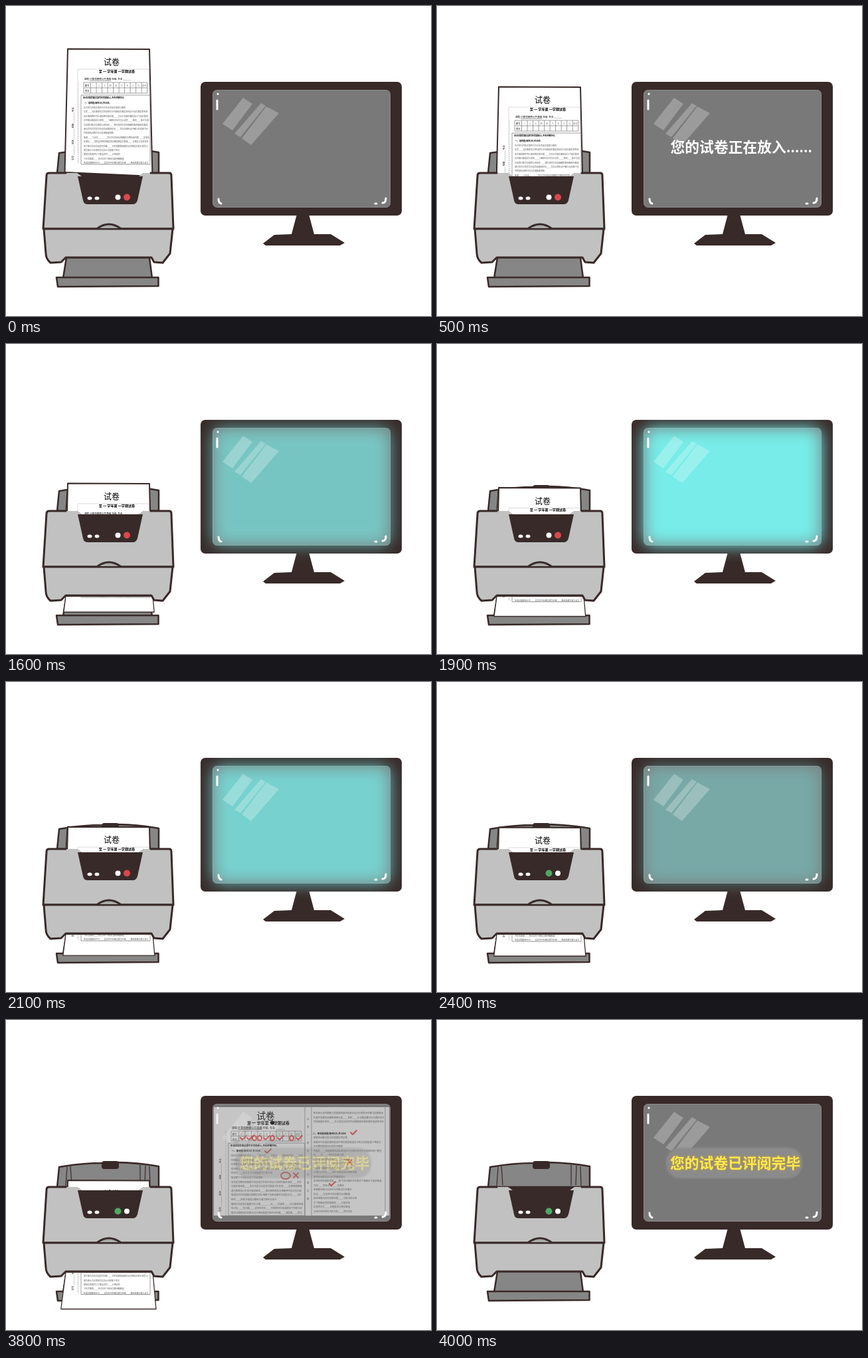
An HTML page for the animation above (5500 ms loop, 640 by 466 pixels).

```html
<!DOCTYPE html>
<html lang="zh-CN">
<head>
<meta charset="utf-8">
<title>试卷扫描</title>
<style>
html, body { margin: 0; width: 100%; height: 100%; overflow: hidden; background: #fff; }
svg { display: block; width: 640px; height: 466px; font-family: "Noto Sans CJK SC", "Noto Sans CJK", "Noto Sans", sans-serif; }
.ink { stroke: #382a29; stroke-width: 3; stroke-linejoin: round; stroke-linecap: round; }
.dark { fill: #382a29; }
.thin { fill: none; stroke: #777; stroke-width: .7; }
.red { fill: none; stroke: #d94a4a; stroke-width: 2; stroke-linecap: round; stroke-linejoin: round; }
.mark { fill: none; stroke: #fff; stroke-width: 3; stroke-linecap: round; }
.message { font-size: 21.8px; font-weight: 700; }
</style>
</head>
<body>
<svg id="stage" viewBox="0 0 640 466"></svg>
<script>
const LOOP = 5500, STEP = 100;

let seed = 7;
const random = () => (seed = seed * 16807 % 2147483647) / 2147483647;

const text = (x, y, size, value, extra = '') =>
  `<text x="${x}" y="${y}" font-size="${size}" ${extra}>${value}</text>`;

// Small exam prose with answer blanks, about `width` pixels long.
function prose(width, size) {
  const chars = '在计算机网络中数据通信系统的基本组成包括信道传输方式与协议下列说法正确是地址分层模型服务功能应用';
  let line = '', used = 0;
  while (used < width - size) {
    if (random() < .06 && used < width - size * 3) {
      line += '____';
      used += size * 2;
    } else {
      line += chars[Math.floor(random() * chars.length)];
      used += size;
    }
  }
  return line;
}

function paragraph(x, y, width, count, gap, size, shortShare = .3) {
  let out = '';
  for (let i = 0; i < count; i++) {
    const part = random() < shortShare ? .4 + random() * .3 : 1;
    out += text(x, y + i * gap, size, prose(width * part, size), 'fill="#555"');
  }
  return out;
}

function scoreTable(x, y, width, height) {
  let d = `M${x} ${y}h${width}v${height}h${-width}zM${x} ${y + height / 2}h${width}`;
  for (let i = 0; i < 10; i++) d += `M${x + width * (.11 + i * .089)} ${y}v${height}`;
  let out = `<path class="thin" d="${d}"/>`;
  out += text(x + 2, y + height * .4, 3.2, '题号') + text(x + 2, y + height * .9, 3.2, '得分');
  [...'一二三四五六七八九'].forEach((n, i) => {
    out += text(x + width * (.135 + i * .089), y + height * .4, 3.2, n, 'fill="#555"');
  });
  return out + text(x + width * .92, y + height * .4, 3.2, '总分', 'fill="#555"');
}

function exam({ x, width, top, bottom, title, sub, form, table, gap, size }) {
  const inner = width - 7, height = top - 3 - table;
  return text(title.x, title.y, title.size, '试卷', `text-anchor="middle" font-weight="${title.weight}"`) +
    text(sub.x, sub.y, sub.size, '至 一 学年第 一学期试卷', 'text-anchor="middle" font-weight="700"') +
    text(x + 5, form, size * 1.2, '课程 <tspan text-decoration="underline">计算机网络公共基础</tspan> 年级: 专业 ______') +
    scoreTable(x + 4, table, width * .92, height) +
    `<path class="thin" d="M${x} ${bottom}V${top}H${x + width}V${bottom}z"/>` +
    text(x + 3, top + 5, size, '本试试题答案全部写在答题纸上,不论对错均可。', 'font-weight="700"') +
    text(x + 5, top + 13, size, '一、填空题(每空1分,共30分)', 'font-weight="700"') +
    paragraph(x + 4, top + 20, inner, Math.floor((bottom - top - 20) / gap) + 1, gap, size) +
    text(-(bottom - 6), x - 11, 3.5, '学号 ________ 姓名 ________ 班级 ________ 专业', 'transform="rotate(-90)"') +
    `<path class="thin" stroke-dasharray="1 2" d="M${x - 4} ${table}V${bottom}"/>`;
}

const check = (x, y) => `<path class="red" d="M${x - 4} ${y}l3 3l6 -6"/>`;
const cross = (x, y) => `<path class="red" d="M${x - 4} ${y - 3}l7 7m0 -7l-7 7"/>`;
const ring = (x, y, rx, ry) => `<ellipse class="red" cx="${x}" cy="${y}" rx="${rx}" ry="${ry}"/>`;

const printed = exam({
  x: 113, width: 104, top: 134, bottom: 238, gap: 6.4, size: 3,
  title: { x: 159, y: 89, size: 12, weight: 500 }, sub: { x: 167, y: 99.5, size: 5.1 }, form: 111, table: 115
}) + '<path fill="none" stroke="#ccc" stroke-width=".7" d="M108 235V95H215V134"/>';

const scanned = `<rect x="313" y="131" width="264" height="163" fill="#ebebec"/>` +
  exam({
    x: 335, width: 115, top: 185, bottom: 294, gap: 6.6, size: 3.4,
    title: { x: 391, y: 149, size: 13.5, weight: 400 }, sub: { x: 395, y: 156.5, size: 6 }, form: 163.5, table: 167
  }) +
  '<path class="thin" d="M450 131V294M460 131V294M571 131V294"/>' +
  [...'试卷一密封线内不要答题'].map((c, i) => text(453, 150 + i * 12, 3.4, c, 'fill="#555"')).join('') +
  paragraph(463, 141, 106, 3, 6.5, 3.4) +
  text(462, 172, 3.4, '二、单项选择题(每空1分,共30分)', 'font-weight="700"') +
  paragraph(463, 178, 104, 18, 6.5, 3.4, .6) +
  '<circle cx="401" cy="154.500" r="3"/>' +
  [357, 367, 392, 413, 441].map(x => check(x, 177)).join('') +
  [374, 382, 401, 430].map(x => ring(x, 177.5, 3, 3.5)).join('') +
  check(394, 197) + check(523, 169) + check(491, 246) +
  ring(421, 234, 7, 5) + cross(437, 233) + cross(518, 213);

const monitor = `
  <path class="dark" d="M438 313h18l8 30h25l21 13l-7 4H391l-4-3l17-13l26-1z"/>
  <rect class="dark" x="293" y="114" width="303" height="201" rx="7"/>
  <rect x="311.500" y="126.500" width="267" height="176" rx="6" fill="#797979" stroke="#8c8c8c"/>
  <g id="glow" clip-path="url(#monitorShape)">
    <rect x="311" y="126" width="268" height="177" rx="14" fill="#77ece8" filter="url(#soft)"/>
  </g>
  <path fill="#fff" opacity=".25" d="M357 138l14 9l-30 40l-15-10zM384 146l7 4l-38 47l-9-5zM392 151l19 10l-42 48l-14-10z"/>
  <path class="mark" d="M319 132v.2M318 142v13"/>
  <g id="page">${scanned}</g>
  <path class="mark" d="M320 290q0 6 4 7M572 289q0 7-5 7M556 297h2"/>
  <g id="loading" class="message" fill="#fff">
    <text x="351.500" y="220">您的试卷正在放入</text>
    <text id="dots" x="526" y="220" font-size="20"></text>
  </g>
  <g id="done">
    <rect x="345" y="192" width="205" height="46" rx="21" fill="#8b8b8b" filter="url(#slight)"/>
    <text class="message" x="351" y="223" fill="#c79b3c" stroke="#c79b3c" stroke-width="2" opacity=".5" filter="url(#slight)">您的试卷已评阅完毕</text>
    <text class="message" x="351" y="223" fill="#ffea4a">您的试卷已评阅完毕</text>
  </g>`;

const scanner = `
  <path class="ink" style="stroke-width:2.500" fill="#868686" d="M77 251L80 221Q115 215 146 215L168 214Q204 215 230 220V251z"/>
  <path class="ink" style="stroke-width:1.200" fill="none" d="M92 221l-2 28M97 220l2 28M202 218v30M210 219l-1 29M216 220l1 29"/>
  <rect class="dark" x="144" y="212" width="26" height="12" rx="4"/>
  <path class="dark" d="M107 250H206L204 258H110z"/>
  <g clip-path="url(#feed)">
    <g id="sheetIn">
      <path class="ink" style="stroke-width:2" fill="#fff" d="M93 64.500L216 65L220.500 256L88.500 250z"/>
      ${printed}
    </g>
  </g>
  <path class="ink" style="stroke-width:2.500" fill="#868686" d="M91 378H216L220 409H86z"/>
  <path class="ink" style="stroke-width:2.500" fill="#868686" d="M76 408H229.500V421L78 422z"/>
  <g id="output">
    <path id="sheetOut" class="ink" style="stroke-width:1.300" fill="#fff"/>
    <g clip-path="url(#exit)"><g id="printOut">${printed}</g></g>
  </g>
  <path fill="#c1c1c1" d="M65 251H107L114 256H200L207 251H246Q249 251 249 255L252 335H56L61 255Q61 251 65 251z"/>
  <path class="ink" fill="none" d="M90 251H65Q61 251 61 255L56 335H252L249 255Q249 251 246 251H218"/>
  <path class="ink" fill="#c1c1c1" d="M57 335H251L247 372L236 386L223 385L219 378H90L83 385L67 386Q60 380 60 372z"/>
  <path class="ink" fill="#aaa" d="M138 334Q155 322 172 334"/>
  <path class="dark" d="M108 256H206L198 292Q196 298 191 298H123Q117 298 116 292z"/>
  <g fill="#fff">
    <ellipse cx="126" cy="289" rx="3.500" ry="2.500"/><ellipse cx="137" cy="289" rx="3.500" ry="2.500"/>
    <circle id="leftLamp" cx="168.500" cy="287.500"/><circle id="rightLamp" cx="182" cy="287.500"/>
  </g>`;

const stage = document.getElementById('stage');
stage.innerHTML = `
  <defs>
    <filter id="soft" x="-20%" y="-25%" width="140%" height="150%"><feGaussianBlur stdDeviation="12"/></filter>
    <filter id="slight" x="-10%" y="-30%" width="120%" height="160%"><feGaussianBlur stdDeviation="1.500"/></filter>
    <clipPath id="monitorShape"><rect x="293" y="114" width="303" height="201" rx="7"/><path d="M438 313h18l4 16h-26z"/></clipPath>
    <clipPath id="feed"><path d="M80 0H230V251H207L200 256H114L107 251H80z"/></clipPath>
    <clipPath id="exit"><path d="M90 379H221L229 466H79z"/></clipPath>
  </defs>${monitor}${scanner}`;

const el = id => document.getElementById(id);
const set = (id, attributes) => {
  for (const name in attributes) el(id).setAttribute(name, attributes[name]);
};

// Linear interpolation through [time, value] keys.
function track(t, keys) {
  const next = keys.findIndex(key => key[0] > t);
  if (next < 0) return keys[keys.length - 1][1];
  if (next === 0) return keys[0][1];
  const [t0, v0] = keys[next - 1], [t1, v1] = keys[next];
  return v0 + (v1 - v0) * (t - t0) / (t1 - t0);
}

const sheetTop = [[0, 64], [500, 121], [600, 134], [1200, 191], [1400, 201],
  [1600, 209], [1900, 215.5], [2200, 218], [3700, 218], [3900, 263]];

function draw(t) {
  const shift = track(t, sheetTop) - 64, finished = t >= 4000;
  // The sheet's lower half follows it once it has moved.
  const feedEdge = 256 + shift;
  set('sheetIn', { transform: `translate(0 ${shift})`, opacity: finished ? 0 : 1 });
  set('printOut', { transform: `translate(0 ${shift - 2})` });
  const edge = feedEdge + 2, out = edge - 379;
  set('output', { opacity: out > 0 && !finished ? 1 : 0 });
  set('sheetOut', { d: `M90 379H221L${221 + out * .09} ${edge}H${90 - out * .13}z` });

  set('loading', { opacity: track(t, [[0, 0], [300, 1], [1200, 1], [1500, 0]]) });
  el('dots').textContent = '.'.repeat(Math.min(6, t / STEP % 7 + 1));
  set('glow', { opacity: track(t, [[1200, 0], [1800, 1], [1900, 1], [2400, .42], [2700, 0]]) });
  set('page', { opacity: track(t, [[2500, 0], [2800, 1], [3700, 1], [4000, 0]]) });
  set('done', { opacity: track(t, [[3700, 0], [4000, 1]]) });

  const ready = t >= 2400;
  set('leftLamp', { r: ready ? 5 : 4, fill: ready ? '#4fa863' : '#fff' });
  set('rightLamp', { r: ready ? 4 : 5, fill: ready ? '#fff' : '#d9494c' });
}

function tick() {
  draw(Math.floor(performance.now() % LOOP / STEP) * STEP);
  requestAnimationFrame(tick);
}
tick();
</script>
</body>
</html>
```
